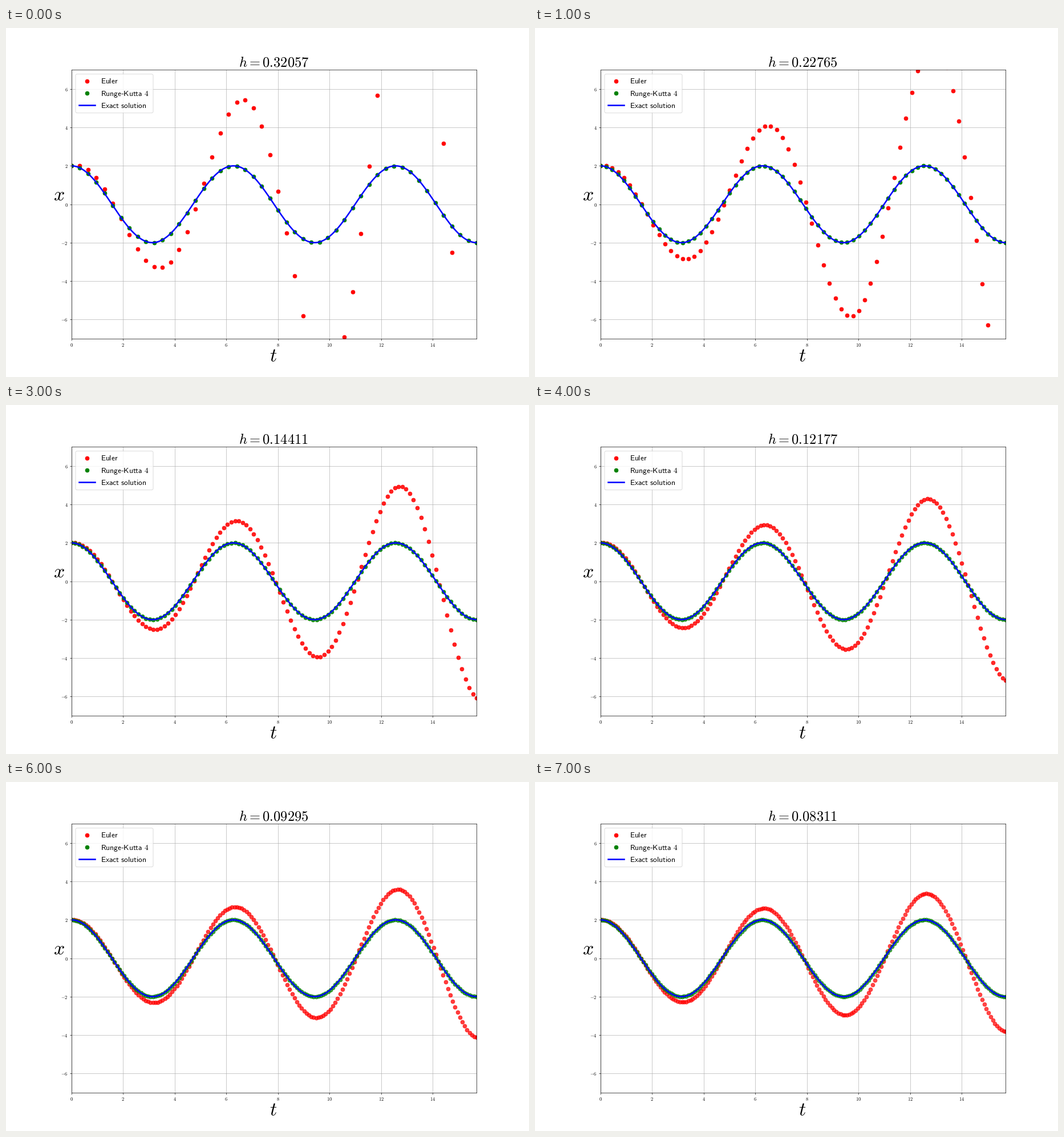
Recreate the animation shown at these times as a matplotlib script. Size 917 px wide and 611 px high, loop 8 s.

```python
import numpy as np
import matplotlib.pyplot as plt
from matplotlib.animation import FuncAnimation
from matplotlib.patches import FancyBboxPatch

W, H, DPI = 917, 611, 64
PT = 72 / DPI  # points per pixel
T_END = 5 * np.pi
X0 = 2

plt.rcParams.update({
    "mathtext.fontset": "cm",
    "font.family": "Liberation Sans",
    "axes.linewidth": 0.68 * PT,
    "grid.linewidth": 0.68 * PT,
    "grid.color": "#b0b0b0",
    "lines.markersize": 6.8 * PT,
    "lines.markeredgewidth": 0.85 * PT,
    "lines.linewidth": 2.55 * PT,
})
for axis in ("xtick", "ytick"):
    plt.rcParams.update({
        f"{axis}.major.width": 0.68 * PT,
        f"{axis}.major.size": 2.97 * PT,
        f"{axis}.major.pad": 2.97 * PT,
        f"{axis}.labelsize": 8.5 * PT,
    })

fig = plt.figure(figsize=(W / DPI, H / DPI), dpi=DPI, facecolor="white")
ax = fig.add_axes([0.125, 0.11, 0.775, 0.77])
ax.set_xlim(0, T_END)
ax.set_ylim(-7, 7)
xt, yt = range(0, 15, 2), range(-6, 7, 2)
ax.set_xticks(xt, [f"${v}$" for v in xt])
ax.set_yticks(yt, [f"${v}$" for v in yt])
ax.grid(True)
ax.set_axisbelow(True)

euler, = ax.plot([], [], "o", color="red")
rk4, = ax.plot([], [], "o", color="green")
t_fine = np.linspace(0, T_END, 1000)
ax.plot(t_fine, X0 * np.cos(t_fine), color="blue")

# Overlay in pixel coordinates, y pointing down
page = fig.add_axes([0, 0, 1, 1], zorder=5)
page.set_xlim(0, W)
page.set_ylim(H, 0)
page.axis("off")


def label(x, y, text, size, ha="center"):
    return page.text(x, y, text, fontsize=size * PT, ha=ha, va="baseline")


title = label(469.3, 68, "", 24.45)
label(93.2, 302, "$x$", 34)
label(469, 584, "$t$", 34)

page.add_patch(FancyBboxPatch(
    (122, 80.7), 136, 68, boxstyle="round,pad=0,rounding_size=2.7",
    fc="white", ec="0.8", lw=0.85 * PT, alpha=0.8))
page.plot(142, 92.6, "o", color="red")
page.plot(142, 114, "o", color="green")
page.plot([128.2, 156], [135, 135], color="blue")
label(166.5, 97.4, r"$\mathsf{Euler}$", 13.45, "left")
label(166.5, 118.9, r"$\mathsf{Runge}$-$\mathsf{Kutta\ 4}$", 13.45, "left")
label(166.5, 140, r"$\mathsf{Exact\ solution}$", 13.45, "left")


def update(i):
    n = 49 + 20 * i
    h = T_END / n
    k = np.arange(n + 1)
    z = 1j * h
    # Each scheme multiplies the complex state by a fixed factor per step
    euler.set_data(k * h, X0 * ((1 + z) ** k).real)
    rk4.set_data(k * h, X0 * ((1 + z + z**2 / 2 + z**3 / 6 + z**4 / 24) ** k).real)
    for dots in (euler, rk4):
        dots.set_alpha(1 - 0.04 * i)
    title.set_text(f"$h = {h:.5f}$")
    return euler, rk4, title


anim = FuncAnimation(fig, update, frames=8, interval=1000, repeat=True,
                     repeat_delay=0, blit=False)
plt.show()
```
